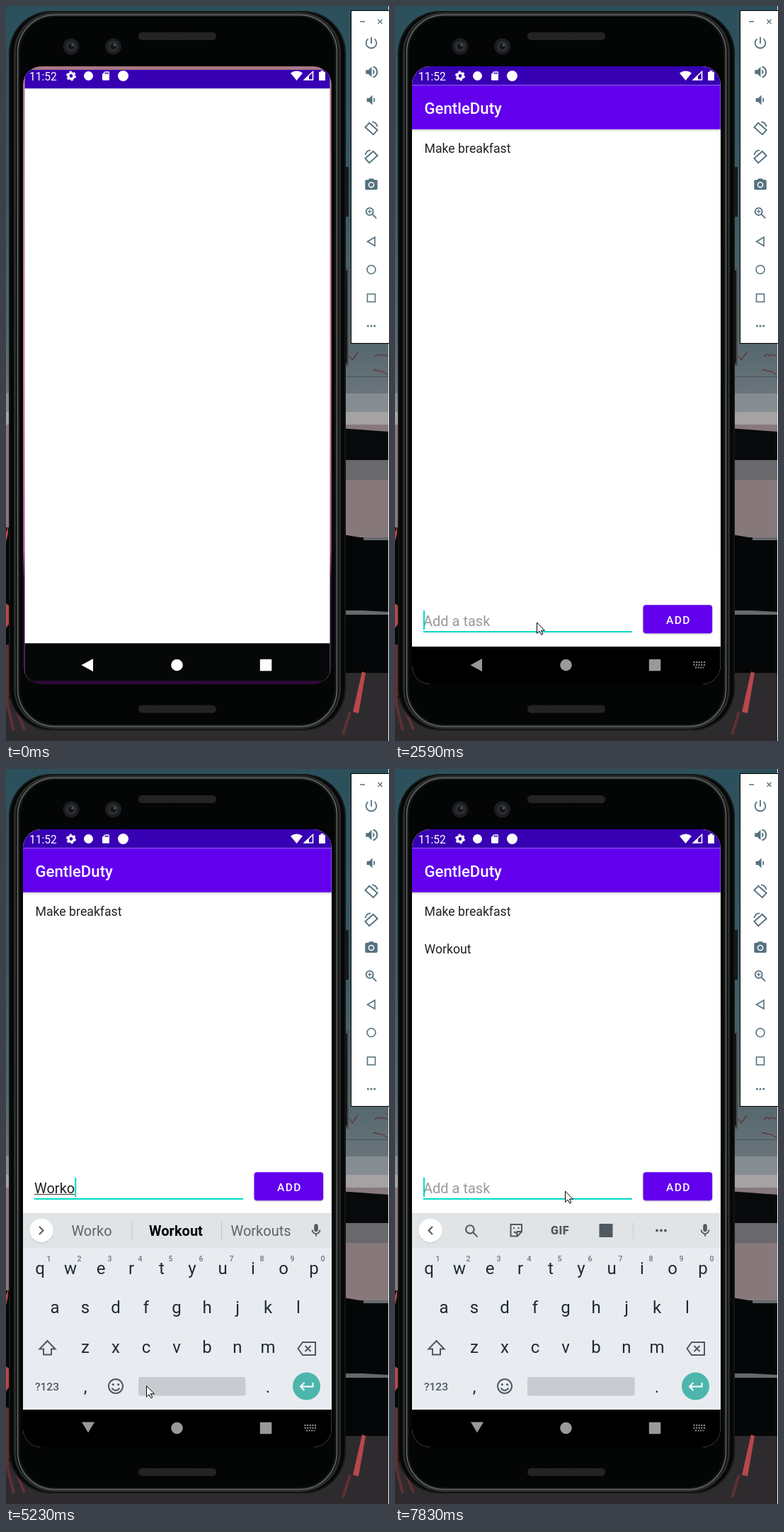
An HTML page that plays this animation: 541 by 1036 pixels, repeating every 8000 ms.

```html
<!DOCTYPE html>
<html lang="en">
<head>
<meta charset="utf-8">
<title>To-do app demo</title>
<style>
  html, body { margin: 0; width: 100%; height: 100%; overflow: hidden; background: #050607; }
  svg { display: block; width: 541px; height: 1036px; font-family: Roboto, sans-serif; }
  .mid { text-anchor: middle; }
  .line { fill: none; stroke: currentColor; stroke-width: 2; }
  .thin { stroke-width: 1.6; }
</style>
</head>
<body>
<svg viewBox="0 0 541 1036">
  <defs>
    <linearGradient id="sky" x2="0" y2="1">
      <stop offset="0" stop-color="#2b505b"/><stop offset=".5" stop-color="#3a5a64"/>
      <stop offset=".85" stop-color="#56676e"/><stop offset="1" stop-color="#6d777d"/>
    </linearGradient>
    <linearGradient id="homeScreen" x2="0" y2="1">
      <stop offset="0" stop-color="#a87886"/><stop offset=".5" stop-color="#c8809a"/>
      <stop offset=".78" stop-color="#b0508c"/><stop offset=".83" stop-color="#33123f"/>
      <stop offset="1" stop-color="#2c0a36"/>
    </linearGradient>
    <linearGradient id="barShadow" x2="0" y2="1">
      <stop offset="0" stop-opacity=".22"/><stop offset="1" stop-opacity="0"/>
    </linearGradient>
    <pattern id="mesh" width="4" height="4" patternUnits="userSpaceOnUse">
      <rect width="4" height="4" fill="#1d1d1d"/><path d="M0 0l4 4M4 0l-4 4" stroke="#2c2c2c" stroke-width=".8"/>
    </pattern>
    <filter id="soft" x="-20%" y="-40%" width="140%" height="200%"><feGaussianBlur stdDeviation="1.600"/></filter>
    <clipPath id="screenClip"><rect x="24" y="85" width="435.700" height="871" rx="26"/></clipPath>
    <clipPath id="contentClip"><path d="M24 111.500h436v791.200H24z"/></clipPath>
    <clipPath id="buttonClip"><rect x="350.500" y="844.300" width="97.600" height="40" rx="4"/></clipPath>

    <symbol id="power" viewBox="0 0 24 24"><path class="line" d="M12 3v10M17 5.900a8 8 0 1 1-10 0"/></symbol>
    <symbol id="volume" viewBox="0 0 24 24"><path d="M3 9v6h4l5 5V4L7 9zM14 8a4.500 4.500 0 0 1 0 8z"/></symbol>
    <symbol id="camera" viewBox="0 0 24 24"><path fill-rule="evenodd" d="M9 2L7.200 4H4a2 2 0 0 0-2 2v12a2 2 0 0 0 2 2h16a2 2 0 0 0 2-2V6a2 2 0 0 0-2-2h-3.200L15 2zM12 7a5 5 0 1 1 0 10a5 5 0 0 1 0-10z"/><circle cx="12" cy="12" r="3.200"/></symbol>
    <symbol id="search" viewBox="0 0 24 24"><circle class="line" cx="9.500" cy="9.500" r="5.500"/><path class="line" d="M14 14l5.800 5.800"/></symbol>
    <symbol id="rotate" viewBox="0 0 24 24"><path class="line" d="M9 4.500L21 15 15 21.500 3 11z"/><path class="line" d="M13 3c4 0 7 3 8 7"/></symbol>
    <symbol id="mic" viewBox="0 0 24 24"><rect x="9" y="2" width="6" height="12" rx="3"/><path class="line" d="M6 11a6 6 0 0 0 12 0M12 17v4"/></symbol>
    <symbol id="sd" viewBox="0 0 24 24"><path fill-rule="evenodd" d="M18 2h-8L4 8v12a2 2 0 0 0 2 2h12a2 2 0 0 0 2-2V4a2 2 0 0 0-2-2zM10 4h2v4h-2zM13 4h2v4h-2zM16 4h2v4h-2z"/></symbol>
    <symbol id="dots" viewBox="0 0 24 24"><circle cx="4.500" cy="12" r="2.400"/><circle cx="12" cy="12" r="2.400"/><circle cx="19.500" cy="12" r="2.400"/></symbol>
  </defs>

  <!-- desktop -->
  <rect width="541" height="560" fill="url(#sky)"/>
  <path fill="#858c92" d="M0 546h541v60H0z"/>
  <path fill="#a5a2a4" d="M0 572h541v35H0z"/>
  <path fill="#87797b" d="M0 590h541v160H0z"/>
  <path fill="#08090b" d="M470 595l71 5v41h-71z"/>
  <path fill="#69686c" d="M470 640h71v28h-71z"/>
  <path fill="#050607" d="M0 735h6v301H0zM470 744l30 5h41v287H0V960h470z"/>
  <path fill="#2d2b2e" d="M470 940h71v96H0v-60h470z"/>
  <path fill="#666a6e" d="M470 852h35l36 2v4h-71zM505 749h36v4h-36z"/>
  <path fill="#44545a" d="M470 522h71v1h-71z"/>
  <path fill="none" stroke="#5d3537" stroke-width="1.300" d="M485 493l4 6 8-11M521 494q5-5 8-1 4-3 10 1M518 514q5-3 8 1 5-2 13 5"/>
  <path fill="#b8474c" d="M0 742l3-8v9l-3 13zM0 842l5 4v24l-5 7zM503 938l5 2-10 57-8-2z"/>
  <path fill="none" stroke="#5f3033" stroke-width="4" d="M2 900v85l9 36M2 960l24 60M486 995l-10 32"/>

  <!-- phone -->
  <path fill="#17191a" d="M478 227h6v70h-6z"/>
  <path fill="#4d4b4b" d="M478 369h6v138h-6z"/><path fill="#151515" d="M478 373h4v130h-4z"/>
  <rect x="4" y="7" width="476" height="1014" rx="60" fill="#060707"/>
  <g fill="none">
    <rect x="5" y="8" width="474" height="1012" rx="59" stroke="#222525"/>
    <rect x="12.500" y="10.500" width="459" height="1007" rx="56" stroke="#292b2b" stroke-width="3"/>
    <rect x="16.500" y="12.500" width="451" height="1003" rx="53" stroke="#5a5d5d" stroke-width="2"/>
    <rect x="19" y="14.500" width="446" height="999" rx="51" fill="#040505" stroke="#1c1e1e"/>
  </g>
  <rect x="187" y="37" width="110" height="11" rx="5.500" fill="url(#mesh)"/>
  <rect x="187" y="985.500" width="110" height="11" rx="5.500" fill="url(#mesh)"/>
  <g id="lenses"></g>

  <!-- emulator panel -->
  <rect x="540" width="1" height="1036" fill="#f2f2f2"/>
  <rect x="487.500" y="6.500" width="60" height="469" fill="#fff" stroke="#000"/>
  <path fill="#fff" d="M540 7h1v468h-1z"/>
  <g fill="#55717f" color="#55717f">
    <path class="line" style="stroke-width:1.300" d="M500 22h7M525.500 19l6 6m0-6l-6 6"/>
    <use href="#power" x="505" y="41" width="22" height="22"/>
    <use href="#volume" x="505.500" y="82" width="22" height="22"/>
    <path class="line" d="M518.500 85.500a7.800 7.800 0 0 1 0 15"/>
    <use href="#volume" x="507" y="122" width="21" height="21"/>
    <use href="#rotate" x="504.500" y="160.500" width="23" height="23"/>
    <use href="#rotate" x="-527.500" y="200.500" width="23" height="23" transform="scale(-1 1)"/>
    <use href="#camera" x="505.500" y="241.500" width="21" height="21"/>
    <use href="#search" x="505" y="281" width="22" height="22"/>
    <path class="line" style="stroke-width:1.300" d="M511 289.700h5.500M513.700 287v5.500"/>
    <path class="line thin" d="M510.500 332l10.500-6v12zM510.500 406h11v11h-11z"/>
    <circle class="line thin" cx="516" cy="371.500" r="6"/>
    <use href="#dots" x="508.500" y="443.500" width="15" height="15"/>
  </g>

  <!-- phone screen -->
  <g clip-path="url(#screenClip)">
    <rect x="24" y="85" width="436" height="871" fill="url(#homeScreen)"/>
    <g id="window">
      <path fill="#fff" d="M24 85h436v871H24z"/><path fill="#3700b3" d="M24 85h436v26.600H24z"/>
      <path id="navBar" d="M24 902.700h436V956H24z"/>
    </g>

    <g fill="#fff" color="#fff">
      <text x="33" y="104.500" font-size="15.600">11:52</text>
      <circle class="line" cx="92" cy="98.500" r="4" style="stroke-width:3.200"/>
      <circle class="line" cx="92" cy="98.500" r="6" style="stroke-dasharray:3.140 3.140"/>
      <circle cx="116.500" cy="98.500" r="6.500"/>
      <use href="#sd" x="133" y="91" width="16" height="15"/>
      <circle cx="165.500" cy="98.500" r="7.500"/>
      <path d="M402 94.500q8.500-6 17 0l-8.500 10.500z"/>
      <path class="line thin" d="M421.500 104h12V92.500z"/>
      <path d="M421 104.500h7v-6z"/>
      <path d="M442 93h2.500v-2h4v2h2.500v12h-9z"/>
    </g>

    <g id="content" clip-path="url(#contentClip)">
      <path fill="#fff" d="M24 111h436v792H24z"/>
      <path fill="url(#barShadow)" d="M24 173.700h436v3.500H24z"/>
      <path fill="#6200ee" d="M24 111h436v62.700H24z"/>
      <text x="41.500" y="151.500" font-size="22.200" font-weight="500" fill="#fff">GentleDuty</text>
      <g font-size="17.700" fill="#212121">
        <text x="41.500" y="207">Make breakfast</text>
        <text id="newTask" x="41.500" y="260">Workout</text>
      </g>
      <g id="form">
        <text id="entry" x="40" y="873.500" font-size="20"></text>
        <rect id="composing" x="40" y="875" height="1" fill="#333"/>
        <rect id="underline" x="40" y="881" width="295"/>
        <rect id="caret" y="852" width="2" height="27" fill="#03dac5"/>
        <rect id="shadow" x="351" y="846" width="97" height="39" rx="4" filter="url(#soft)"/>
        <g clip-path="url(#buttonClip)">
          <path fill="#6200ee" d="M350 844h99v41h-99z"/>
          <circle id="ripple" cx="384" cy="865" fill="#fff"/>
        </g>
        <text x="383" y="870.500" font-size="15.500" font-weight="500" letter-spacing="1.400" fill="#fff">ADD</text>
      </g>

      <g id="keyboard" fill="#50595f" color="#50595f">
        <path fill="#e8ecf0" d="M24 626h436v277H24z"/><path fill="#e0e4e7" d="M24 626h436v49H24z"/>
        <circle cx="50" cy="651.500" r="17" fill="#000" opacity=".12"/>
        <circle cx="50" cy="650.500" r="16.700" fill="#fff"/>
        <path id="chevron" class="line"/>
        <use href="#mic" x="427" y="639.500" width="22" height="22"/>
        <g id="tools">
          <use href="#search" x="96" y="639" width="25" height="25"/>
          <path class="line" d="M163.500 642h15.500v10l-6 6.500h-9.500zM172.500 658v-6h6M168 652q2.500 3 5 1"/>
          <path d="M167 646h2v2h-2zM173.500 646h2v2h-2z"/>
          <text class="mid" x="233" y="656" font-size="16" font-weight="900" letter-spacing=".5">GIF</text>
          <rect x="288.500" y="641" width="19" height="19"/>
          <path fill="#c5cacd" d="M336 639h1v23h-1z"/>
          <use href="#dots" x="366.500" y="641" width="19" height="19"/>
        </g>
        <g id="suggestions" class="mid" font-size="20">
          <path fill="#c2c7ca" d="M177.500 638h1v26h-1zM304 638h1v26h-1z"/>
          <text x="121" y="658"></text><text x="240" y="658"></text><text x="360" y="658"></text>
        </g>
        <g id="keys" class="mid" font-size="24" fill="#1f2a31"></g>
        <path class="line" d="M58.500 806l11 11.500h-5.500v8h-11v-8h-5.500zM419 808h18v18h-18l-6.500-9zM422.500 813l8 8m0-8l-8 8"/>
        <text class="mid" x="58" y="876" font-size="15.500" font-weight="500">?123</text>
        <circle class="line" cx="155" cy="870" r="10"/>
        <path class="line" d="M149.500 872.500q5.500 7 11 0"/><circle cx="151.300" cy="867.500" r="1.600"/><circle cx="158.700" cy="867.500" r="1.600"/>
        <rect x="187" y="857" width="151.500" height="26.500" rx="3" fill="#c8ccd0"/>
        <circle cx="424.500" cy="870" r="19.500" fill="#4db6ac"/>
        <path class="line" style="stroke:#fff" d="M433.500 865v5.500h-17.500m5.500-5.500l-5.500 5.500 5.500 5.500"/>
      </g>
    </g>

    <g id="nav">
      <path id="back"/><circle cx="241.500" cy="929" r="8.300"/><rect x="358.800" y="920.800" width="16.500" height="16.500" rx="1"/>
      <path id="imeIcon" fill="none" stroke="#999" stroke-width="2" stroke-dasharray="2 1.600" d="M421.500 925h17M421.500 928.700h17M424 932.500h12"/>
    </g>
  </g>

  <path id="mouse" d="M0 0v15.500l3.600-3.300 2.600 5 2.200-1-2.500-5h5z" fill="#fff" stroke="#000"/>
</svg>
<script>
const LOOP = 8000;
const $ = id => document.getElementById(id);
const set = (id, attrs) => Object.entries(attrs).forEach(([k, v]) => $(id).setAttribute(k, v));
const show = (id, on) => { $(id).style.display = on ? '' : 'none'; };
const within = (t, from, to) => t >= from && t < to;
// Latest entry [time, ...values] that has started.
const held = (steps, t) => steps.findLast(s => t >= s[0]).slice(1);

$('lenses').innerHTML = [92, 151.5].map(x => `<circle cx="${x}" cy="57" r="11.5" fill="#1c1d20"/>
  <circle cx="${x}" cy="57" r="7.5" fill="#2c2e33"/><circle cx="${x}" cy="57" r="4" fill="#141518"/>
  <circle cx="${x + 2}" cy="55" r="1.8" fill="#555a61"/>`).join('');

const keyRow = (letters, x, y) => [...letters].map((c, i) =>
  `<text x="${x + i * 43}" y="${y}">${c}</text>`).join('');
$('keys').innerHTML = keyRow('qwertyuiop', 48, 712) + keyRow('asdfghjkl', 69, 767) +
  keyRow('zxcvbnm', 112, 823) + keyRow(',', 112, 879) + keyRow('.', 370, 879) +
  `<g font-size="10.5" font-weight="500" fill="#6b757b">${keyRow('1234567890', 60.5, 694)}</g>`;

const mousePath = [[0, -50, 0], [1650, 105, 423], [1780, 138, 560], [1900, 180, 720], [2030, 211, 838],
  [2160, 200.5, 869], [3040, 198.5, 869.5], [5960, 214, 860], [6110, 250, 812], [6260, 300, 730],
  [6410, 345, 650], [6560, 374, 602], [6710, 384, 587], [7140, 374, 590], [7280, 340, 593],
  [7420, 297, 595], [7560, 258, 596], [7690, 240.5, 595]];
const typed = [[0, ''], [4560, 'W'], [4690, 'Wo'], [4820, 'Wor'], [4950, 'Work'],
  [5230, 'Worko'], [5380, 'Workou'], [5530, 'Workout'], [6870, '']];
const hints = [[0, '', '', ''], [4560, 'W', 'We', 'What'], [4690, 'Wo', 'Would', 'Won'],
  [4820, 'Wor', 'Work', 'Word'], [4950, 'Work', 'Works', 'Worked'], [5230, 'Worko', 'Workout', 'Workouts'],
  [5380, 'Workou', 'Workout', 'Workouts'], [5530, 'Workout', 'Workouts', 'Work out']];
const navShade = [[0, '#fff'], [660, '#e4e4e4'], [930, '#c0c0c0'], [1080, '#b0b0b0'], [1380, '#999']];
const keyboardDrop = [[0, 290], [2740, 170], [2890, 35], [3040, 0]];
const rippleSteps = [[0, 0, 0], [6710, 28, .22], [6870, 63, .22], [6990, 110, .22], [7140, 110, .14],
  [7280, 110, .05], [7420, 0, 0]];
const caretOff = [[0, 2440], [3040, 3600], [4030, 4560], [6110, 6560], [7420, 7830]];

function render(t) {
  set('window', { transform: t < 120 ? 'translate(242 520) scale(.9885) translate(-242 -520)' : '' });
  set('navBar', { fill: t < 120 ? '#060808' : '#000' });
  set('content', { opacity: t < 930 ? 0 : t < 1080 ? .12 : 1 });
  set('nav', { fill: held(navShade, t)[0] });
  set('back', { d: t < 2740 ? 'M106.500 929l16.500-9v18z' : 'M107 920.500h18l-9 15z' });
  show('imeIcon', t >= 2590);
  show('newTask', t >= 6990);

  const focused = t >= 2440;
  const text = held(typed, t)[0];
  set('form', { transform: `translate(0 ${t < 2890 ? 0 : -276})` });
  $('entry').textContent = text || 'Add a task';
  set('entry', { fill: text ? '#212121' : '#999' });
  const width = text ? $('entry').getComputedTextLength() : 0;
  set('composing', { width });
  set('caret', { x: 40 + width });
  show('caret', !caretOff.some(([from, to]) => within(t, from, to)));
  set('underline', focused ? { height: 2, fill: '#03dac5' } : { height: 1, fill: '#999' });

  const [r, opacity] = held(rippleSteps, t);
  set('ripple', { r, opacity });
  set('shadow', { opacity: r ? .38 : .3, transform: `translate(0 ${r ? 4 : 0})` });

  const suggesting = within(t, 4560, 7140);
  set('keyboard', { transform: `translate(0 ${held(keyboardDrop, t)[0]})` });
  show('tools', !suggesting);
  show('suggestions', suggesting);
  set('chevron', { d: suggesting ? 'M47 645l5.500 5.500-5.500 5.500' : 'M53 645l-5.500 5.500 5.500 5.500' });
  const words = held(hints, t);
  document.querySelectorAll('#suggestions text').forEach((el, i) => {
    const correction = i === 1 && within(t, 4560, 5530);
    el.textContent = words[i];
    el.setAttribute('font-weight', correction ? 700 : 400);
    el.setAttribute('fill', correction ? '#000' : '#5b646a');
  });

  set('mouse', { transform: `translate(${held(mousePath, t)})` });
}

function tick() {
  render(performance.now() % LOOP);
  requestAnimationFrame(tick);
}
tick();
</script>
</body>
</html>
```
